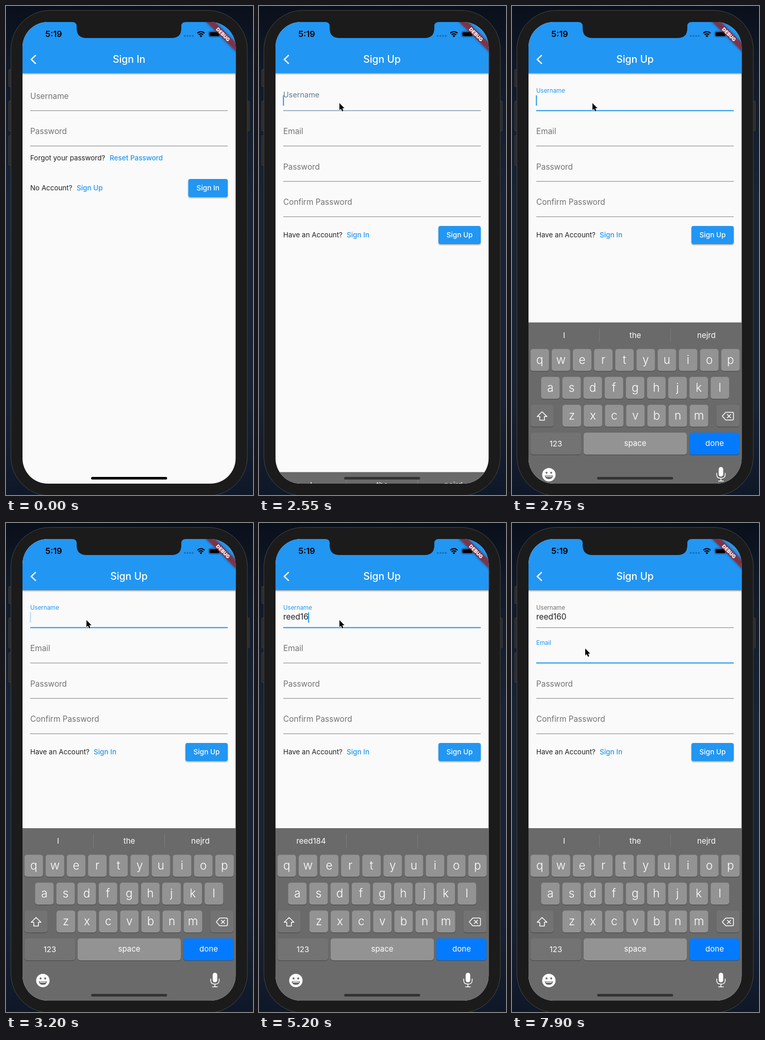
An HTML page for the animation above (8 s loop, 479 px wide and 947 px high).

```html
<!DOCTYPE html>
<html lang="en">
<head>
<meta charset="utf-8">
<title>Sign up form</title>
<style>
html, body { margin: 0; width: 100%; height: 100%; overflow: hidden; background: #0e1624; }
svg { display: block; width: 100%; height: 100%; font-family: Inter, "Open Sans", sans-serif; }
text { white-space: pre; }
.mid { text-anchor: middle; }
.label { font-size: 15.35px; fill: #737373; }
.value { font-size: 15.4px; fill: #212121; }
.body { font-size: 13.4px; fill: #212121; }
.link { font-size: 13.5px; font-weight: 500; fill: #2196f3; }
.btn { font-size: 13.6px; font-weight: 500; fill: #fff; }
.title { font-size: 19.4px; font-weight: 500; fill: #fff; }
.key { font-size: 22.5px; font-weight: 300; fill: #fff; }
.word { font-size: 15px; fill: #fff; }
</style>
</head>
<body>
<svg id="stage" viewBox="0 0 479 947"></svg>
<script>
const LOOP = 8000;
const SWAP = 1350;
const FOCUS_USER = 2502;
const KEYBOARD_UP = 2530;
const FOCUS_MAIL = 7092;
const ROWS = [202.5, 271, 339.5, 408];
const NAME = "reed160";
const KEY_TIMES = [3400, 3550, 3750, 3900, 4250, 4900, 5450];
const GRAY = [115, 115, 115], LINE = [146, 146, 146], BLUE = [33, 150, 243];

// Pointer stops: time, x, y
const POINTER = [
  [100, 474, 940], [200, 400, 690], [300, 336, 488], [450, 321, 411], [600, 321, 411],
  [850, 263, 390], [950, 207, 368], [1100, 189, 358], [1200, 168, 353], [1850, 168, 353],
  [2100, 160, 248], [2350, 156, 188], [6000, 156, 188], [6350, 148, 222], [6750, 142, 243]
];

const rect = (x, y, w, h, r, fill, extra = "") =>
  `<rect x="${x}" y="${y}" width="${w}" height="${h}" rx="${r}" fill="${fill}" ${extra}/>`;
const text = (cls, x, y, str, extra = "") =>
  `<text class="${cls}" x="${x}" y="${y}" ${extra}>${str}</text>`;
const path = (d, extra) => `<path d="${d}" ${extra}/>`;

function field(label, y, id = "") {
  return `<text class="label" id="${id}Label" transform="translate(47 ${y - 23})">${label}</text>
    <rect id="${id}Line" x="47" y="${y - 0.5}" width="383" height="1.2" fill="#929292"/>`;
}

function button(label, x, y) {
  const w = 430 - x;
  return rect(x, y, w, 35, 4, "#2196f3", 'filter="url(#lift)"') +
    text("btn mid", x + w / 2, y + 22.3, label);
}

const signIn = text("title mid", 238.5, 110, "Sign In") +
  field("Username", ROWS[0], "inUser") + field("Password", ROWS[1], "inPass") +
  text("body", 47, 299, "Forgot your password?") + text("link", 201, 299, "Reset Password") +
  text("body", 47, 357, "No Account?") + text("link", 137, 357, "Sign Up") +
  button("Sign In", 353.5, 335);

const signUp = text("title mid", 238.5, 110, "Sign Up") +
  field("Username", ROWS[0], "user") + field("Email", ROWS[1], "mail") +
  field("Password", ROWS[2], "pass") + field("Confirm Password", ROWS[3], "confirm") +
  text("value", 47, 187.3, "", 'id="typed"') + rect(46.4, 173, 2, 20, 0, "#2196f3", 'id="caret"') +
  text("body", 47, 448, "Have an Account?") + text("link", 170, 448, "Sign In") +
  button("Sign Up", 348, 426);

function keycap(x, y, w, fill) {
  return rect(x, y + 1.2, w, 42.5, 5, "#4d4d4d") + rect(x, y, w, 42.5, 5, fill);
}

function keyRow(letters, x0, y) {
  return [...letters].map((c, i) => {
    const x = x0 + 41.1 * i;
    return keycap(x, y, 36, "#939393") + text("key mid", x + 18, y + 28.3, c);
  }).join("");
}

function keyboard() {
  const thin = 'fill="none" stroke="#fff" stroke-width="1.5" stroke-linejoin="round" stroke-linecap="round"';
  const words = [101, 239, 377].map((x, i) => text("word mid", x, 621, "", `id="word${i}"`)).join("");
  const face = '<circle cx="71.5" cy="886" r="13" fill="#fff"/>' +
    '<circle cx="67" cy="882" r="1.9" fill="#6a6a6a"/><circle cx="76" cy="882" r="1.9" fill="#6a6a6a"/>' +
    path("M63.5 887.5H79.5Q78.5 894.5 71.5 894.5T63.5 887.5Z", 'fill="#6a6a6a"') +
    path("M65.5 889.3H77.5", 'stroke="#fff" stroke-width="1.4"');
  const mic = rect(400.8, 871, 8.8, 18.5, 4.4, "#fff") +
    path("M397 883V886Q397 893 405.2 893T413.4 886V883M405.2 893V898M400.5 898.3H410", thin);
  return rect(30, 591, 418, 345, 0, "#6a6a6a") +
    path("M169.5 603V628M307.5 603V628", 'stroke="#7b7b7b"') + words +
    keyRow("qwertyuiop", 35.8, 642.5) + keyRow("asdfghjkl", 56.4, 696.5) + keyRow("zxcvbnm", 98, 750.5) +
    keycap(35.8, 750.5, 45, "#737373") + keycap(396.3, 750.5, 45, "#737373") +
    path("M58.3 764L67.8 773.3H62.8V780.5H53.8V773.3H48.8Z", thin) +
    path("M414.5 765H427Q429.5 765 429.5 767.5V777.5Q429.5 780 427 780H414.5L407.8 772.5ZM417.5 769.2L424 775.8M424 769.2L417.5 775.8", thin) +
    keycap(35.8, 804.5, 98.5, "#737373") + text("word mid", 85, 831, "123") +
    keycap(139, 804.5, 200, "#939393") + text("word mid", 239, 830, "space") +
    keycap(343.8, 804.5, 97.5, "#047bff") + text("word mid", 393, 830, "done") + face + mic;
}

const side = (x, y, h) => rect(x, y, 7, h, 1.5, "#292929", 'stroke="#4c4c4c" stroke-width="0.8"');

const statusBar = text("mid", 92.5, 60, "5:19", 'font-size="16.2" font-weight="600"') +
  [347, 352.2, 357.4, 362.6].map(x => `<circle cx="${x - 0.3}" cy="58" r="1.8" fill="#1a6cae"/>`).join("") +
  path("M371 52.6Q378 46.6 385 52.6M373.6 55.7Q378 52 382.4 55.7", 'fill="none" stroke="#000" stroke-width="2.3"') +
  path("M375.3 57.8Q378 55.7 380.7 57.8L378 60.6Z", "") +
  rect(392.8, 48.8, 22.6, 11.2, 3.2, "none", 'stroke="#125489"') + rect(394.4, 50.4, 19.4, 8, 1.8, "#000") +
  path("M417 52.5Q419 54.4 417 56.4Z", 'fill="#125489"');

const banner = `<g transform="translate(445 31) rotate(45)">` +
  rect(-50, 28, 100, 12, 0, "#000", 'opacity=".38" filter="url(#soft)"') +
  rect(-50, 28, 100, 12, 0, "#b71c1c", 'opacity=".63"') +
  text("mid", 0, 37.6, "DEBUG", 'font-size="9.6" font-weight="900" fill="#fff"') + "</g>";

const stage = document.getElementById("stage");
stage.innerHTML = `
<defs>
  <linearGradient id="sky" x2="0" y2="1">
    <stop stop-color="#0a101b"/><stop offset=".12" stop-color="#101928"/>
    <stop offset=".4" stop-color="#182436"/><stop offset=".8" stop-color="#182335"/>
    <stop offset="1" stop-color="#0f1828"/>
  </linearGradient>
  <clipPath id="screen"><rect x="32" y="31" width="413.3" height="894" rx="49"/></clipPath>
  <filter id="lift" x="-20%" y="-30%" width="140%" height="180%">
    <feDropShadow dx="0" dy="1.6" stdDeviation="1.3" flood-opacity=".38"/>
  </filter>
  <filter id="soft" x="-10%" y="-100%" width="120%" height="300%"><feGaussianBlur stdDeviation="2.5"/></filter>
</defs>
${rect(0, 0, 479, 947, 0, "url(#sky)")}
${side(5.4, 123, 33)}${side(5.4, 184, 58)}${side(5.4, 251, 57.5)}${side(464.8, 184, 58)}
${rect(9.5, 8.5, 458.5, 940, 76, "#1b1b1b", 'stroke="#454545"')}
<g clip-path="url(#screen)">
  ${rect(30, 30, 418, 900, 0, "#fafafa")}
  ${rect(20, 29, 440, 101, 0, "#2196f3", 'filter="url(#lift)"')}
  ${path("M57.8 95.2L49 103.5L57.8 111.8", 'fill="none" stroke="#fff" stroke-width="2.5"')}
  <g id="signIn">${signIn}</g>
  <g id="signUp">${signUp}</g>
  <g id="keyboard">${keyboard()}</g>
  ${statusBar}${banner}
  ${rect(165, 912, 147.5, 5, 2.5, "#000", 'id="home"')}
</g>
${path("M128 30H349V31Q340 31 340 39V43Q340 62 321 62H156Q137 62 137 43V39Q137 31 128 31Z", 'fill="#1b1b1b"')}
<g id="pointer">${path("M0 0V13.6L3 10.9L5.3 16L7.7 15L5.5 10H9.7Z", 'fill="#000" stroke="#fff" stroke-width="1.1" paint-order="stroke"')}</g>`;

const el = {};
stage.querySelectorAll("[id]").forEach(node => el[node.id] = node);
const set = (id, name, value) => el[id].setAttribute(name, value);
const show = (id, on) => set(id, "display", on ? "inline" : "none");
const clamp = v => Math.min(1, Math.max(0, v));
const mix = (a, b, p) => a + (b - a) * p;
const blend = (a, b, p) => `rgb(${a.map((v, i) => Math.round(mix(v, b[i], p)))})`;

// Cubic bezier (.4, 0, .2, 1)
function ease(x) {
  let lo = 0, hi = 1, s = 0.5;
  for (let i = 0; i < 20; i++) {
    s = (lo + hi) / 2;
    const at = 1.2 * s * (1 - s) ** 2 + 0.6 * s * s * (1 - s) + s ** 3;
    if (at < x) lo = s; else hi = s;
  }
  return 3 * s * s * (1 - s) + s ** 3;
}

function pointerAt(t) {
  const next = POINTER.findIndex(p => p[0] > t);
  if (next < 0) return POINTER[POINTER.length - 1].slice(1);
  const a = POINTER[next - 1], b = POINTER[next];
  const p = (t - a[0]) / (b[0] - a[0]);
  return [mix(a[1], b[1], p), mix(a[2], b[2], p)];
}

// Solid for 600 ms, then toggles every 500 ms with a short fade
function caretAlpha(dt) {
  if (dt < 600) return 1;
  const step = Math.floor((dt - 600) / 500);
  const p = clamp(((dt - 600) % 500) / 200);
  const out = 1 - (1 - p) ** 1.7;
  return step % 2 ? out : 1 - out;
}

function drawField(id, y, float, focus) {
  set(id + "Label", "transform", `translate(47 ${y - mix(23, 34.7, float)}) scale(${mix(1, 0.75, float)})`);
  el[id + "Label"].style.fill = blend(GRAY, BLUE, focus);
  const h = mix(1.2, 2, focus);
  set(id + "Line", "height", h);
  set(id + "Line", "y", y + 0.1 - h / 2);
  set(id + "Line", "fill", blend(LINE, BLUE, focus));
}

function suggestions(count) {
  const typed = NAME.slice(0, count);
  if (count === 0) return ["I", "the", "nejrd"];
  if (count <= 4) return [`“${typed}”`, "reeds", "reedy"];
  if (count === 6) return ["reed184", "", ""];
  return [`“${typed}”`, "", ""];
}

function draw(t) {
  show("signIn", t < SWAP);
  show("signUp", t >= SWAP);

  const userIn = ease(clamp((t - FOCUS_USER) / 200));
  const mailIn = ease(clamp((t - FOCUS_MAIL) / 200));
  drawField("user", ROWS[0], userIn, userIn - mailIn);
  drawField("mail", ROWS[1], mailIn, mailIn);

  const count = KEY_TIMES.filter(k => k <= t).length;
  const onMail = t >= FOCUS_MAIL;
  el.typed.textContent = NAME.slice(0, count);
  suggestions(onMail ? 0 : count).forEach((w, i) => el["word" + i].textContent = w);

  show("caret", t >= FOCUS_USER);
  if (t >= FOCUS_USER) {
    const since = onMail ? FOCUS_MAIL : count ? KEY_TIMES[count - 1] : FOCUS_USER;
    const width = onMail || !count ? 0 : el.typed.getComputedTextLength();
    set("caret", "x", 46.4 + width);
    set("caret", "y", onMail ? 241.5 : 173);
    set("caret", "opacity", caretAlpha(t - since));
  }

  // Critically damped rise
  const w = Math.max(0, t - KEYBOARD_UP) / 50;
  const drop = 334 * (1 + w) * Math.exp(-w);
  set("keyboard", "transform", `translate(0 ${drop.toFixed(2)})`);
  set("home", "fill", drop < 325 ? "#333" : "#000");

  show("pointer", t >= 100);
  if (t >= 100) set("pointer", "transform", `translate(${pointerAt(t)})`);
}

const start = performance.now();
function tick() {
  draw((performance.now() - start) % LOOP);
  requestAnimationFrame(tick);
}
tick();
</script>
</body>
</html>
```
